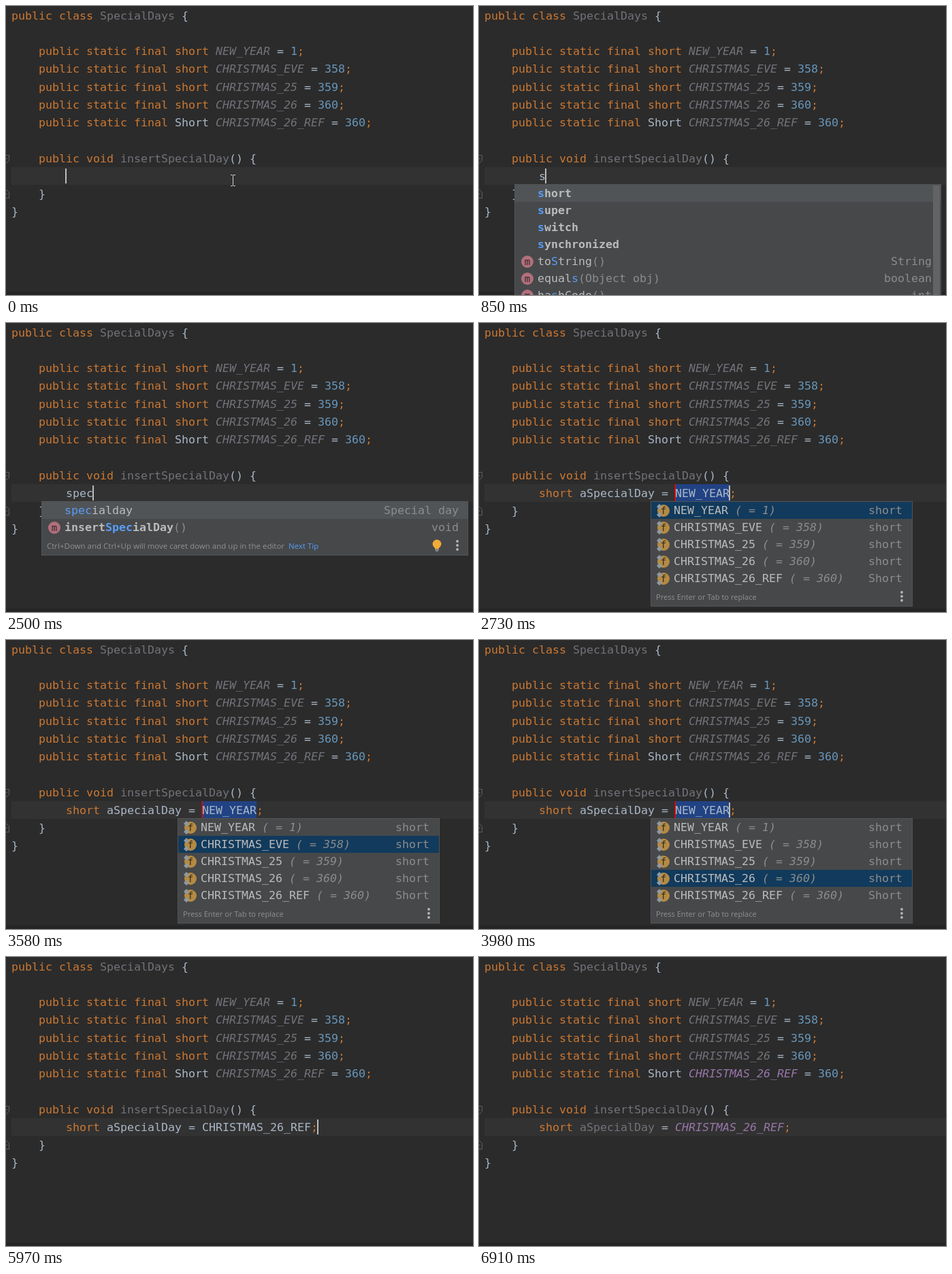
An HTML page with a canvas for the animation above (7.37 s loop, 686 by 425 pixels).

```html
<!DOCTYPE html>
<html lang="en">
<head>
<meta charset="utf-8">
<title>Code completion</title>
<style>
html, body { margin: 0; width: 100%; height: 100%; overflow: hidden; background: #2b2b2b; }
canvas { display: block; }
</style>
</head>
<body>
<canvas id="stage" width="686" height="425"></canvas>
<script>
const ctx = document.getElementById('stage').getContext('2d');
const LOOP = 7370;
const CELL = 10;
const MONO = '16.61px "DejaVu Sans Mono", monospace';
const ROW = 25;

// style key: colour, font prefix
const STYLES = {
  k: ['#cc7832', ''],
  t: ['#a9b7c6', ''],
  n: ['#6897bb', ''],
  u: ['#72737a', ''],
  i: ['#72737a', 'italic '],
  p: ['#9876aa', 'italic '],
  w: ['#bbbbbb', ''],
  b: ['#bbbbbb', 'bold '],
  m: ['#589df6', ''],
  M: ['#589df6', 'bold '],
  g: ['#8c8c8c', ''],
  h: ['#8c8c8c', 'italic ']
};

function rect(x, y, w, h, color) {
  ctx.fillStyle = color;
  ctx.fillRect(x, y, w, h);
}

function disc(x, y, r, color) {
  ctx.fillStyle = color;
  ctx.beginPath();
  ctx.arc(x, y, r, 0, Math.PI * 2);
  ctx.fill();
}

function shape(points, color, stroke) {
  ctx.beginPath();
  points.forEach(([x, y]) => ctx.lineTo(x, y));
  if (stroke) {
    ctx.strokeStyle = color;
    ctx.lineWidth = 1;
    ctx.stroke();
  } else {
    ctx.fillStyle = color;
    ctx.fill();
  }
}

function label(text, x, y, font, color, align = 'left') {
  ctx.font = font;
  ctx.fillStyle = color;
  ctx.textAlign = align;
  ctx.fillText(text, x, y);
}

// each run is a style key followed by its text
function runs(x, y, list) {
  for (const run of list) {
    const [color, prefix] = STYLES[run[0]];
    const text = run.slice(1);
    label(text, x, y, prefix + MONO, color);
    x += text.length * CELL;
  }
}

function code(row, col, ...list) {
  runs(8 + col * CELL, Math.floor(20 + 26.25 * row), list);
}

function constant(row, type, name, value, style = 'i') {
  code(row, 4, 'kpublic static final ', type, style + name, 't = ', 'n' + value, 'k;');
}

function caret(x) {
  rect(x - 1, 239, 2, 22, '#bbbbbb');
}

function foldMarks() {
  const color = '#5c5f61';
  shape([[0, 219.5], [4.5, 219.5], [4.5, 227], [0, 231.5]], color, true);
  shape([[0, 282.5], [4.5, 282.5], [4.5, 274], [0, 269.5]], color, true);
  rect(0, 224, 2, 1, color);
  rect(0, 276, 2, 1, color);
}

function mouseBeam() {
  const color = '#d0d0d0';
  rect(333, 249, 1, 15, color);
  for (const y of [248, 264]) {
    rect(330, y, 3, 1, color);
    rect(334, y, 3, 1, color);
  }
}

function editor(t) {
  rect(0, 0, 686, 425, '#2b2b2b');
  rect(8, 237, 678, 26, '#323232');
  rect(0, 420, 686, 5, '#252526');
  foldMarks();
  code(0, 0, 'kpublic class ', 'uSpecialDays ', 't{');
  constant(2, 'kshort ', 'NEW_YEAR', 1);
  constant(3, 'kshort ', 'CHRISTMAS_EVE', 358);
  constant(4, 'kshort ', 'CHRISTMAS_25', 359);
  constant(5, 'kshort ', 'CHRISTMAS_26', 360);
  constant(6, 'tShort ', 'CHRISTMAS_26_REF', 360, t >= 6360 ? 'p' : 'i');
  code(8, 4, 'kpublic void ', 'uinsertSpecialDay', 't() {');
  code(10, 4, 't}');
  code(11, 0, 't}');
}

function bulb(x, y) {
  disc(x, y, 6.4, '#f2ab38');
  rect(x - 3, y + 4, 6, 3, '#f2ab38');
  rect(x - 3, y + 7.5, 6, 1.3, '#a8a9a4');
  rect(x - 2, y + 9.5, 4, 1.2, '#a8a9a4');
}

function methodIcon(x, y) {
  disc(x, y, 9, '#b16f7c');
  label('m', x, y + 4.5, '14px "DejaVu Sans Mono", monospace', '#2f2529', 'center');
}

function fieldIcon(x, y) {
  disc(x, y, 9, '#b48a43');
  label('f', x, y + 5, '14px "DejaVu Sans Mono", monospace', '#2f2a22', 'center');
  for (const dy of [-6, 6]) {
    const cx = x - 6, cy = y + dy;
    shape([[cx - 4, cy], [cx, cy - 4], [cx + 4, cy], [cx, cy + 4]], '#8f999f');
  }
}

function popup({ x, right, end, items, picked, pickColor, icon, tip, tipSize, link, lamp }) {
  const foot = 263 + items.length * ROW;
  const height = (tip ? foot + 29 : foot + 1) - 262;
  rect(x, 262, right - x, height, '#525456');
  rect(x + 1, 263, right - x - 2, height - 2, '#46484a');
  rect(x + 1, 263 + picked * ROW, right - x - 2, ROW, pickColor);
  items.forEach(([list, type, marked], i) => {
    const mid = 275 + i * ROW;
    if (marked) icon(x + 19, mid + 1);
    runs(x + 34, mid + 6, list);
    if (type) label(type, end, mid + 6, MONO, '#8c8c8c', 'right');
  });
  if (!tip) return;
  const font = tipSize + 'px "Open Sans", "Noto Sans", sans-serif';
  label(tip, x + 8, foot + 19, font, '#8f9193');
  if (link) label(link, x + 363, foot + 19, font, '#589df6');
  for (const dy of [8, 14, 20]) disc(right - 16, foot + dy, 1.9, '#b4b6b8');
  if (lamp) bulb(right - 46, foot + 12);
}

const wide = { x: 52, right: 679, end: 665, picked: 0, pickColor: '#515457', icon: methodIcon };

function keywordPopup() {
  const words = ['hort', 'uper', 'witch', 'ynchronized'].map(w => [['Ms', 'b' + w]]);
  popup({
    ...wide,
    items: [
      ...words,
      [['wto', 'mS', 'wtring', 'g()'], 'String', true],
      [['wequal', 'ms', 'g(Object obj)'], 'boolean', true],
      [['wha', 'ms', 'whCode', 'g()'], 'int', true]
    ]
  });
  rect(667, 264, 10, 161, '#616365');
}

function templatePopup(count, lamp) {
  const hit = 'specialday', method = 'SpecialDay';
  popup({
    ...wide, lamp,
    items: [
      [['m' + hit.slice(0, count), 'w' + hit.slice(count)], 'Special day'],
      [['binsert', 'M' + method.slice(0, count), 'b' + method.slice(count), 'g()'], 'void', true]
    ],
    tip: 'Ctrl+Down and Ctrl+Up will move caret down and up in the editor',
    tipSize: 11.5,
    link: 'Next Tip'
  });
}

function valuePopup(picked, lamp) {
  const item = (name, value, type = 'short') => [['w' + name, `h ( = ${value})`], type, true];
  popup({
    x: 252, right: 637, end: 622, picked, pickColor: '#113a5c', icon: fieldIcon, lamp,
    items: [
      item('NEW_YEAR', 1),
      item('CHRISTMAS_EVE', 358),
      item('CHRISTMAS_25', 359),
      item('CHRISTMAS_26', 360),
      item('CHRISTMAS_26_REF', 360, 'Short')
    ],
    tip: 'Press Enter or Tab to replace',
    tipSize: 11.1
  });
}

const within = (t, a, b) => t >= a && t < b;
// how many of the given moments have passed
const passed = (t, moments) => moments.filter(m => t >= m).length;

function typing(t) {
  const count = passed(t, [790, 940, 1100, 1250]);
  code(9, 8, 't' + 'spec'.slice(0, count));
  if (t < 470 || within(t, 790, 1870) || t >= 2500) caret(88 + count * CELL);
  if (t < 790) mouseBeam();
  if (within(t, 850, 1020)) keywordPopup();
  if (t >= 1020) templatePopup(2 + passed(t, [1180, 1400]), t >= 1960);
}

function choosing(t) {
  rect(288, 237, 80, 26, '#214283');
  rect(287.5, 237, 1.5, 26, '#ff0000');
  code(9, 8, 'kshort ', 'taSpecialDay = NEW_YEAR', 'k;');
  if (t < 3520 || within(t, 3980, 4440) || within(t, 4900, 5440)) caret(368);
  if (t >= 2730) {
    const picked = passed(t, [3580, 3750, 3980, 4440]);
    valuePopup(picked, within(t, 3200, 3580) || t >= 4980);
  }
}

function accepted(t) {
  code(9, 8, 'kshort ', (t >= 6360 ? 'u' : 't') + 'aSpecialDay', 't = ',
    (t >= 6280 ? 'p' : 't') + 'CHRISTMAS_26_REF', 'k;');
  if (t < 6910) caret(458);
}

function draw(t) {
  editor(t);
  if (t < 2650) typing(t);
  else if (t < 5970) choosing(t);
  else accepted(t);
}

let start;
function tick(now) {
  start ??= now;
  draw((now - start) % LOOP);
  requestAnimationFrame(tick);
}
draw(0);
requestAnimationFrame(tick);
</script>
</body>
</html>
```
